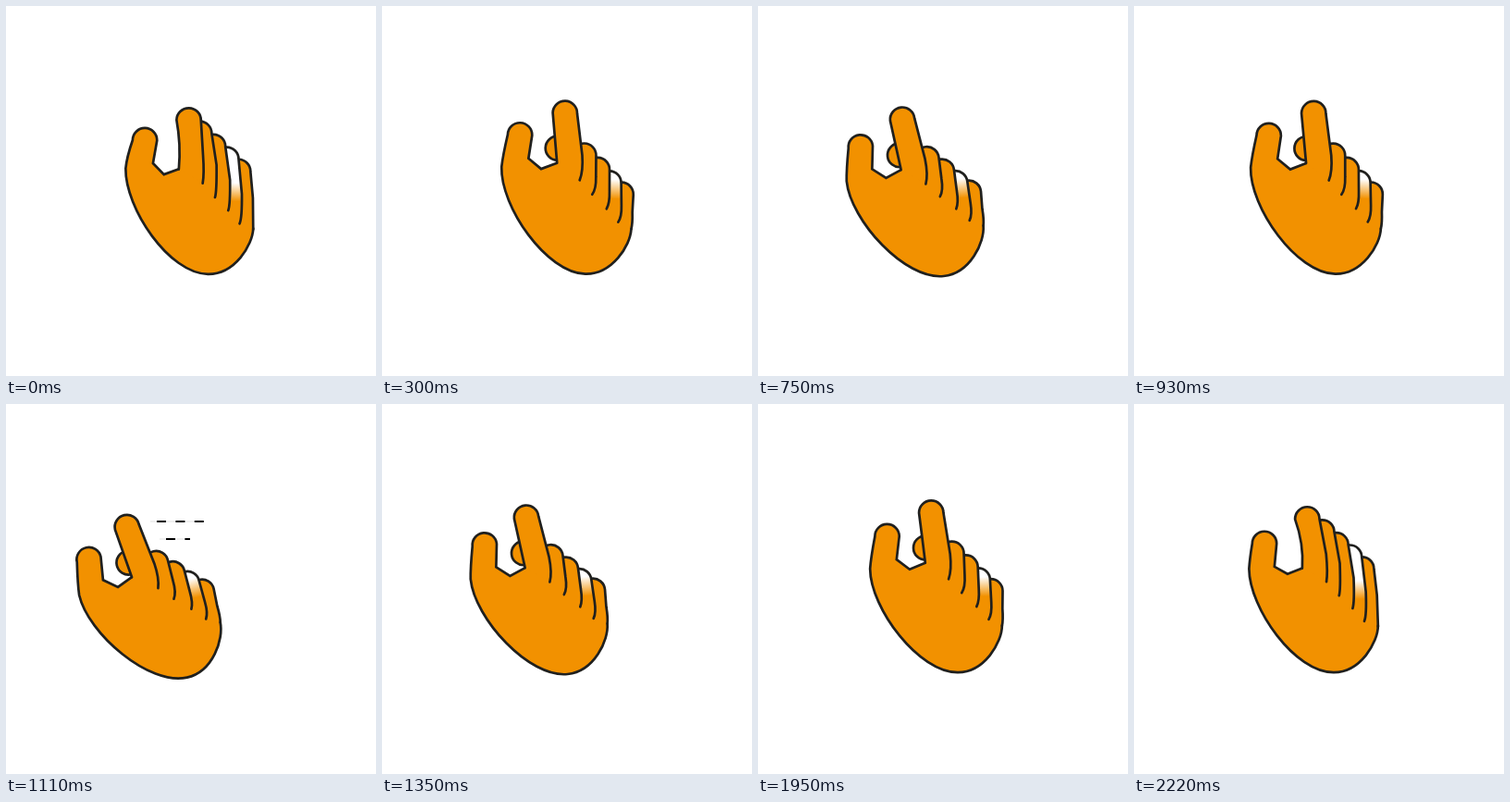
These frames come from a looping animation (400x400 px, 2610 ms). An HTML page with a canvas:

```html
<!DOCTYPE html>
<html lang="en">
<head>
<meta charset="utf-8">
<title>Swiping hand</title>
<style>
  html, body { margin: 0; width: 100%; height: 100%; overflow: hidden; background: #fff; }
  canvas { display: block; }
</style>
</head>
<body>
<canvas id="stage" width="400" height="400"></canvas>
<script>
const ctx = document.getElementById('stage').getContext('2d');
const LOOP = 2610, STEP = 30;
const ORANGE = '#f29100', INK = '#20201e';
const WRIST = [232, 380];

// [time, degrees] of the wrist
const SWING = [[0, 0.8], [300, 1.7], [600, -16.7], [870, 1.7], [900, 1.7],
  [1200, -16.7], [1470, 1.7], [1740, -0.6]];

// Back to front: tip x, tip y, knuckle x, knuckle y, end x, end y
const FINGERS = [
  { open: [248.5, 178.5, 264.5, 207, 265.3, 241], closed: [253.5, 203, 266, 222, 265.3, 240] },
  { open: [235.5, 165.5, 252.5, 203, 250.5, 235], closed: [240, 191, 254, 215, 251, 233], pale: true },
  { open: [221, 152, 239.5, 188, 238, 221], closed: [227, 177, 240.6, 200, 238, 219] },
  { open: [206, 138, 224.7, 172, 223.5, 207], closed: [212, 162, 225.5, 185, 222, 204] }
];

const mix = (a, b, k) => a + (b - a) * k;
const ease = k => (1 - Math.cos(Math.PI * Math.min(1, Math.max(0, k)))) / 2;

function wristAngle(t) {
  const next = SWING.findIndex(key => key[0] > t);
  if (next < 0) return SWING[SWING.length - 1][1];
  const [t0, a0] = SWING[next - 1], [t1, a1] = SWING[next];
  return mix(a0, a1, ease((t - t0) / (t1 - t0)));
}

// The wrist drifts left and back once per swipe, a little behind the rotation
const wristShift = t =>
  t > 420 && t < 1620 ? -3.65 * (1 - Math.cos(2 * Math.PI * (t - 420) / 600)) : 0;

function shape(outline, fill = ORANGE, inside = '') {
  ctx.fillStyle = fill;
  ctx.fill(new Path2D(outline + inside));
  ctx.stroke(new Path2D(outline));
}

function drawFinger({ open, closed, pale }, fist) {
  const [x, y, kx, ky, ex, ey] = open.map((v, i) => mix(v, closed[i], fist));
  let fill = ORANGE;
  if (pale) {
    fill = ctx.createLinearGradient(0, mix(191, 187, fist), 0, mix(211, 208, fist));
    fill.addColorStop(0, '#fff');
    fill.addColorStop(1, ORANGE);
  }
  shape(`M${x - 13} ${y}A13 13 0 0 1 ${x + 13} ${y}L${kx} ${ky}Q${kx + 0.7} ${ey - 6} ${ex} ${ey}`, fill);
}

function drawHand(fist, lean) {
  const r = 13.2;
  const thumbX = mix(143.4, 142, fist) + 3.4 * lean, thumbY = mix(150, 142, fist) - 3.7 * lean;
  const indexX = 190 + 4 * lean, indexY = mix(124, 117, fist);
  const side = mix(126.5, 123.2, fist);
  const webX = mix(184, 183, fist), webY = mix(177, 171, fist);

  // Curled fingertip that shows behind the index finger
  const curlX = mix(198, 183, fist);
  shape(`M${curlX - 13} 155a13 13 0 1 1 26 0a13 13 0 1 1 -26 0`);

  shape(`M265.3 240C265 258 246 290 217 290C175 290 ${side} 220 ${side} 177
    Q${side + 1} 165 ${thumbX - r} ${thumbY}A${r} ${r} 0 0 1 ${thumbX + r} ${thumbY}
    L${mix(154, 152, fist) + 2 * lean} ${mix(175, 167, fist) - 4 * lean}
    L${mix(168, 166, fist)} ${mix(183, 178, fist)}L${webX} ${webY}`, ORANGE, 'L213 165L235 190L250 203');

  FINGERS.forEach(finger => drawFinger(finger, fist));

  shape(`M${webX} ${webY}Q${mix(186, 180, fist)} ${mix(150, 145, fist)} ${indexX - r} ${indexY}
    A${r} ${r} 0 0 1 ${indexX + r} ${indexY}L210 162
    Q211.7 ${mix(182, 179, fist)} ${mix(210, 208, fist)} ${mix(192, 189, fist)}`);
}

function drawSpeedLine(x, y, length) {
  const line = (from, width, color, dash) => {
    ctx.lineWidth = width;
    ctx.strokeStyle = color;
    ctx.setLineDash(dash);
    ctx.beginPath();
    ctx.moveTo(from, y);
    ctx.lineTo(x + length, y);
    ctx.stroke();
  };
  line(x - 7, 0.6, '#ccc', []);
  line(x, 2, '#000', [10, 10.4]);
}

function draw(t) {
  ctx.fillStyle = '#fff';
  ctx.fillRect(0, 0, 400, 400);

  const fist = t < 1000 ? ease(t / 300) : 1 - ease((t - 1920) / 300);
  const lean = t < 300 ? 1 - fist : 0;

  ctx.save();
  ctx.translate(WRIST[0] + wristShift(t), WRIST[1]);
  ctx.rotate(wristAngle(t) * Math.PI / 180);
  ctx.translate(-WRIST[0], -WRIST[1]);
  ctx.lineWidth = 2.7;
  ctx.strokeStyle = INK;
  ctx.lineCap = 'round';
  ctx.lineJoin = 'miter';
  drawHand(fist, lean);
  ctx.restore();

  const phase = t % 600;
  if (t < 1200 && phase >= 450) {
    const x = (t < 600 ? 154 : 163) - (phase - 510) * 0.3;
    ctx.save();
    drawSpeedLine(x, 127, 51);
    drawSpeedLine(x + 10, 146, 26);
    ctx.restore();
  }
}

function tick() {
  const t = performance.now() % LOOP;
  draw(Math.floor(t / STEP) * STEP);
  requestAnimationFrame(tick);
}
tick();
</script>
</body>
</html>
```
